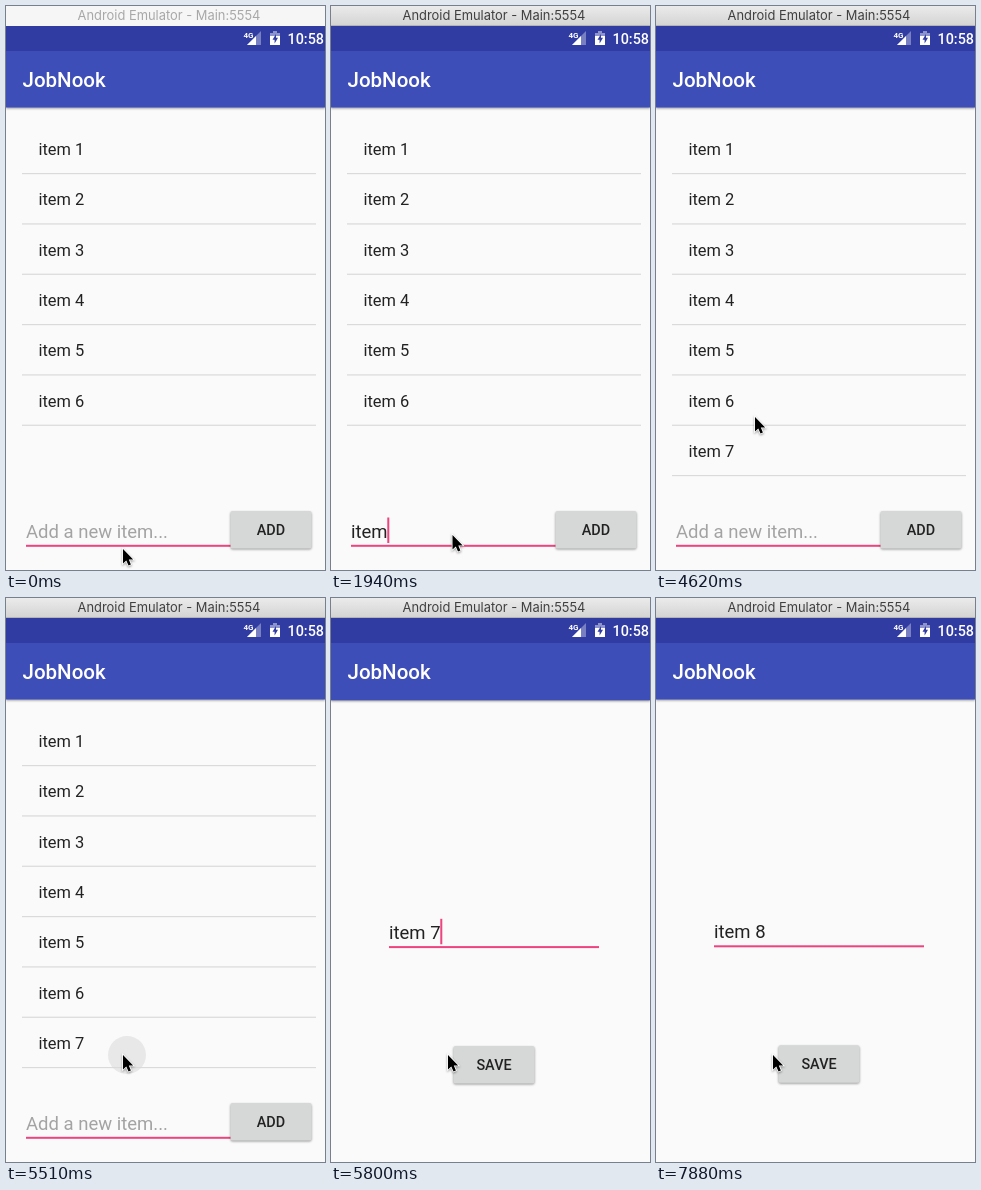
An HTML page that plays this animation: 319 by 564 pixels, repeating every 8 s.

```html
<!DOCTYPE html>
<html lang="en">
<head>
<meta charset="utf-8">
<title>Task list</title>
<style>
  html, body { margin: 0; width: 100%; height: 100%; overflow: hidden; background: #fafafa; }
  svg { display: block; width: 100vw; height: 100vh; }
  text { font-family: Roboto, sans-serif; fill: #222; white-space: pre; }
  .window { font: 12.9px Inter, sans-serif; text-anchor: middle; }
  .heading { font-size: 20.5px; font-weight: 500; fill: #fff; }
  .item { font-size: 16.45px; }
  .input { font-size: 18.5px; }
  .button { font-size: 14.4px; font-weight: 500; text-anchor: middle; }
  .clock { font-size: 14.4px; font-weight: 500; fill: #fff; }
  .lift { filter: drop-shadow(0 1px 1px rgba(0, 0, 0, .38)); }
</style>
</head>
<body>
<svg viewBox="0 0 319 564">
  <defs>
    <linearGradient id="chrome" x2="0" y2="1">
      <stop stop-color="#ebebeb"/><stop offset="1" stop-color="#d3d3d3"/>
    </linearGradient>
  </defs>
  <g id="list"></g>
  <g id="edit"></g>
  <g id="status">
    <rect y="20" width="319" height="25" fill="#303ca2"/>
    <path d="M241 39H255V25Z" fill="#fff" opacity=".35"/>
    <path d="M241 39H250V30Z" fill="#fff"/>
    <text x="237.5" y="31.5" style="font-size:8px;font-weight:700;fill:#fff">4G</text>
    <path d="M264 27H267V25H271V27H274V32H264Z" fill="#fff" opacity=".45"/>
    <path d="M264 30H274V39H264Z" fill="#fff"/>
    <path d="M270 28L266.5 33.8H268.6V37.5L272 31.8H270Z" fill="#303ca2"/>
    <text class="clock" x="281.5" y="38">10:58</text>
  </g>
  <rect id="bar" width="319" height="20"/>
  <rect id="edge" y="19" width="319" height="1" fill="#b4b4b4"/>
  <text id="caption" class="window" x="163" y="14">Android Emulator - Main:5554</text>
  <path id="pointer" class="lift" d="M0 0V14.4L3.3 11.4L5.5 16.4L7.9 15.4L5.8 10.4H10.2Z"
    fill="#000" stroke="#fff" stroke-width="1.6" paint-order="stroke"/>
</svg>
<script>
const LOOP = 8000, ROW = 50.33;
const $ = id => document.getElementById(id);
const show = (el, on) => el.setAttribute('visibility', on ? 'inherit' : 'hidden');

const appBar = () => `
  <rect class="lift" y="44" width="319" height="57.5" fill="#3e4eb8"/>
  <text class="heading" x="16.5" y="80.7">JobNook</text>`;

const button = (x, y, label) => `
  <rect class="lift" x="${x}" y="${y}" width="81" height="37.5" rx="2" fill="#d6d7d7"/>
  <text class="button" x="${x + 40.5}" y="${y + 24}">${label}</text>`;

const field = (id, x, y, width) => `
  <rect x="${x}" y="${y + 7.3}" width="${width}" height="2" fill="#ee437f"/>
  <text id="${id}Text" class="input" x="${x}" y="${y}"></text>
  <rect id="${id}Caret" y="${y - 20}" width="2" height="25.5" fill="#ee437f"/>`;

const row = (_, i) => `<g id="row${i + 1}">
  <text class="item" x="32.5" y="${149 + i * ROW}">item ${i + 1}</text>
  <rect x="16" y="${167 + i * ROW}" width="294" height="1.2" fill="#dadada"/></g>`;

$('list').innerHTML = '<rect y="20" width="319" height="544" fill="#fafafa"/>'
  + '<circle id="ripple" cx="121" cy="457" r="19" fill="#e8e8e8"/>'
  + Array.from({ length: 7 }, row).join('')
  + field('add', 20, 531.5, 205) + button(224.5, 505, 'ADD') + appBar();
$('edit').innerHTML = '<rect y="20" width="319" height="560" fill="#fafafa"/>'
  + field('save', 58, 340, 210) + button(122.5, 447.3, 'SAVE') + appBar();

// Each track holds [start time, ...values]; values jump at their start time.
const pointerTrack = [
  [0, 117, 543], [150, 118, 543], [300, 121, 541], [590, 121, 534], [740, 121.5, 529],
  [3280, 122.5, 529.5], [3430, 168, 534], [3570, 227, 535],
  [4320, 205, 510], [4470, 138, 445], [4620, 99, 411], [4760, 101, 420],
  [4910, 105, 432], [5060, 110, 444], [5210, 114, 452], [5360, 117, 457]
];
const addTrack = [
  [0, '', 0], [150, '', 1], [740, '', 0], [1340, '', 1],
  [1490, 'i', 1], [1640, 'it', 1], [1790, 'ite', 1], [1940, 'item', 1],
  [2540, 'item ', 1], [2830, 'item 7', 1], [3430, 'item 7', 0],
  [4020, '', 1], [4320, '', 0], [4910, '', 1], [5360, '', 0]
];
const saveTrack = [
  [0, 'item 7', 1], [6090, 'item 7', 0], [6690, 'item 7', 1],
  [7140, 'item ', 1], [7430, 'item 8', 1], [7880, 'item 8', 0]
];
// Opacity and vertical offset of the edit screen as it slides in.
const editTrack = [[0, 0, 0], [5650, .5, 15], [5800, 1, .8], [5950, 1, 0]];

const at = (track, t) => track.findLast(key => key[0] <= t).slice(1);

function setField(id, x, [value, caret], hint = '') {
  const text = $(id + 'Text');
  text.textContent = value || hint;
  text.style.fill = value ? '#222' : '#a3a3a3';
  const end = value ? text.getComputedTextLength() : 0;
  $(id + 'Caret').setAttribute('x', x + end - .3);
  show($(id + 'Caret'), caret);
}

function draw(now) {
  const t = now % LOOP;
  const focused = t >= 590;
  $('bar').setAttribute('fill', focused ? 'url(#chrome)' : '#f6f6f6');
  $('caption').style.fill = focused ? '#404040' : '#a8a8a8';
  show($('edge'), focused);

  setField('add', 20, at(addTrack, t), 'Add a new item...');
  setField('save', 58, at(saveTrack, t));
  show($('row7'), t >= 4020);
  show($('ripple'), t >= 5510);

  const [alpha, shift] = at(editTrack, t);
  show($('edit'), alpha);
  $('edit').setAttribute('opacity', alpha);
  $('edit').setAttribute('transform', `translate(0 ${shift})`);
  $('pointer').setAttribute('transform', `translate(${at(pointerTrack, t)})`);
  requestAnimationFrame(tick);
}

let start;
function tick(now) {
  start ??= now;
  draw(now - start);
}
requestAnimationFrame(tick);
</script>
</body>
</html>
```
